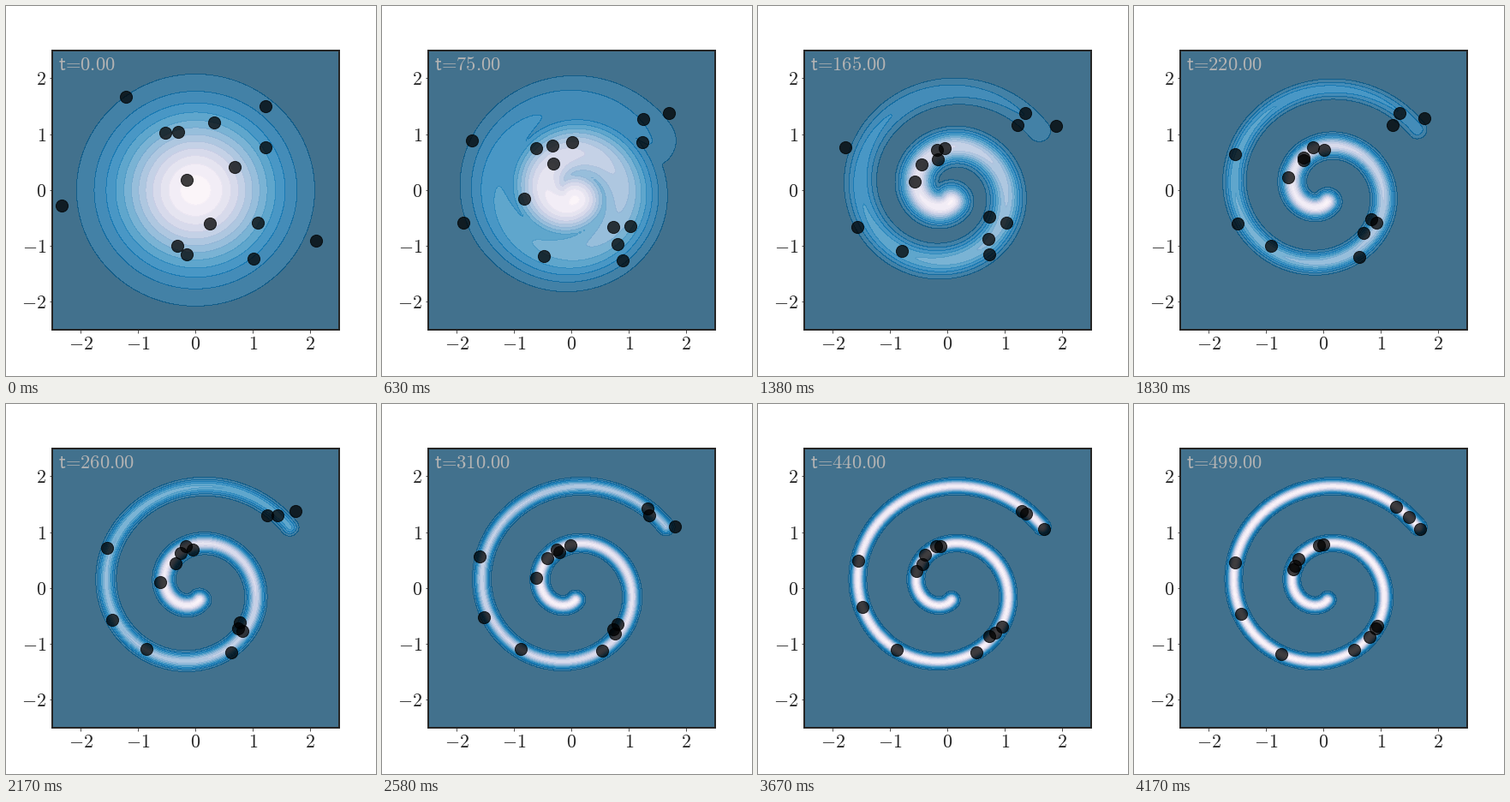
Animation of 432 by 432 pixels, one loop 4210 ms. Source, as a matplotlib script:

```python
import numpy as np
import matplotlib.pyplot as plt
from matplotlib.animation import FuncAnimation

plt.rcParams["mathtext.fontset"] = "cm"

LOOP_MS, TICKS = 4210, 211
TICK_MS = LOOP_MS / TICKS
FPS, LAST = 24, 499
STEPS = np.minimum(5 * np.arange(101), LAST)
PITCH, PHASE = 0.164, 0.09      # clockwise Archimedean spiral
TURN = (1.35, 12.07)
WIDTH, PRIOR = 0.0094, 0.586    # energy scales of spiral and Gaussian
LEVELS = np.arange(14) * 0.08
INK = "#262626"

# Each particle: start point and the spiral turn where it settles
PARTICLES = [
    (-1.21, 1.67, 9.8), (-.53, 1.03, 4.1), (-.30, 1.04, 3.9),
    (.32, 1.21, 4.8), (1.22, 1.50, 12.1), (1.22, .77, 11.8),
    (.68, .41, 11.95), (-.15, .18, 4.7), (-2.33, -.28, 9.2),
    (-.32, -1.00, 3.8), (-.15, -1.15, 8.5), (.25, -.60, 7.0),
    (1.08, -.58, 7.05), (1.01, -1.23, 7.2), (2.10, -.90, 7.5),
]


def spiral(turn):
    r, a = PITCH * turn, PHASE - turn
    return r * np.cos(a), r * np.sin(a)


def blend(step):
    """Sigmoid weight of the spiral, rescaled to run from 0 to 1."""
    s = 1 / (1 + np.exp(5 - step / 50))
    low = 1 / (1 + np.exp(5))
    return (s - low) / (1 - 2 * low)


def bridge(rng, shape, size):
    """Random walks that begin and end at zero."""
    walk = rng.normal(0, size, shape).cumsum(axis=0)
    s = np.linspace(0, 1, shape[0])[:, None]
    return walk - (1 - s) * walk[0] - s * walk[-1]


def particle_paths():
    x, y, turn = np.array(PARTICLES).T
    angle = np.unwrap([np.arctan2(y, x), PHASE - turn], axis=0)
    radius = np.hypot(x, y), PITCH * turn
    settle = 1 - np.exp(-STEPS / 80)[:, None]
    r = radius[0] + (radius[1] - radius[0]) * settle
    a = angle[0] + (angle[1] - angle[0]) * settle

    # The walk is free along the spiral and stiff across it
    rng = np.random.default_rng(4)
    stiff = 1 - 0.7 * blend(STEPS)[:, None]
    a = a + bridge(rng, a.shape, 0.03) / np.maximum(r, 0.5)
    r = r + bridge(rng, r.shape, 0.03) * stiff
    return np.stack([r * np.cos(a), r * np.sin(a)], axis=-1)


axis = np.linspace(-2.5, 2.5, 150)
X, Y = np.meshgrid(axis, axis)
dist2 = np.full(X.shape, np.inf)
for px, py in zip(*spiral(np.linspace(*TURN, 600))):
    dist2 = np.minimum(dist2, (X - px) ** 2 + (Y - py) ** 2)
spiral_energy = dist2 / WIDTH
prior_energy = PRIOR * (X ** 2 + Y ** 2)
paths = particle_paths()

fig = plt.figure(figsize=(6, 6), dpi=72, facecolor="white")
ax = fig.add_axes([0.125, 0.125, 0.775, 0.755])
ax.set(xlim=(-2.5, 2.5), ylim=(-2.5, 2.5))
ticks = range(-2, 3)
names = [f"${k}$" for k in ticks]
ax.set_xticks(ticks, names)
ax.set_yticks(ticks, names)
ax.tick_params(labelsize=22, length=3.5, width=0.8, pad=3.5, colors=INK)
for spine in ax.spines.values():
    spine.set(linewidth=2, edgecolor=INK)

dots = ax.scatter(*paths[0].T, s=200, c="black", alpha=0.75, zorder=3)
label = ax.text(0.022, 0.929, "", transform=ax.transAxes, size=22.5,
                color="0.7", va="baseline", zorder=4)
field, shown = None, None


def draw(tick):
    """Show the step due by the end of this tick; redraw only on change."""
    global field, shown
    due = int((TICK_MS * (tick + 1) + 4) * FPS / 1000)
    i = min(due, len(STEPS) - 1)
    if i != shown:
        if field is not None:
            field.remove()
        w = blend(STEPS[i])
        density = np.exp(-(1 - w) * prior_energy - w * spiral_energy)
        field = ax.contourf(X, Y, density, levels=LEVELS, cmap="PuBu_r", alpha=0.75)
        dots.set_offsets(paths[i])
        label.set_text(r"$\mathsf{t}\hspace{-0.2}=\hspace{-0.2}"
                       rf"\mathsf{{{STEPS[i]:.2f}}}$")
        shown = i
    return field, dots, label


anim = FuncAnimation(fig, draw, frames=TICKS, init_func=lambda: draw(0),
                     interval=TICK_MS, repeat=True, repeat_delay=0)
plt.show()
```
